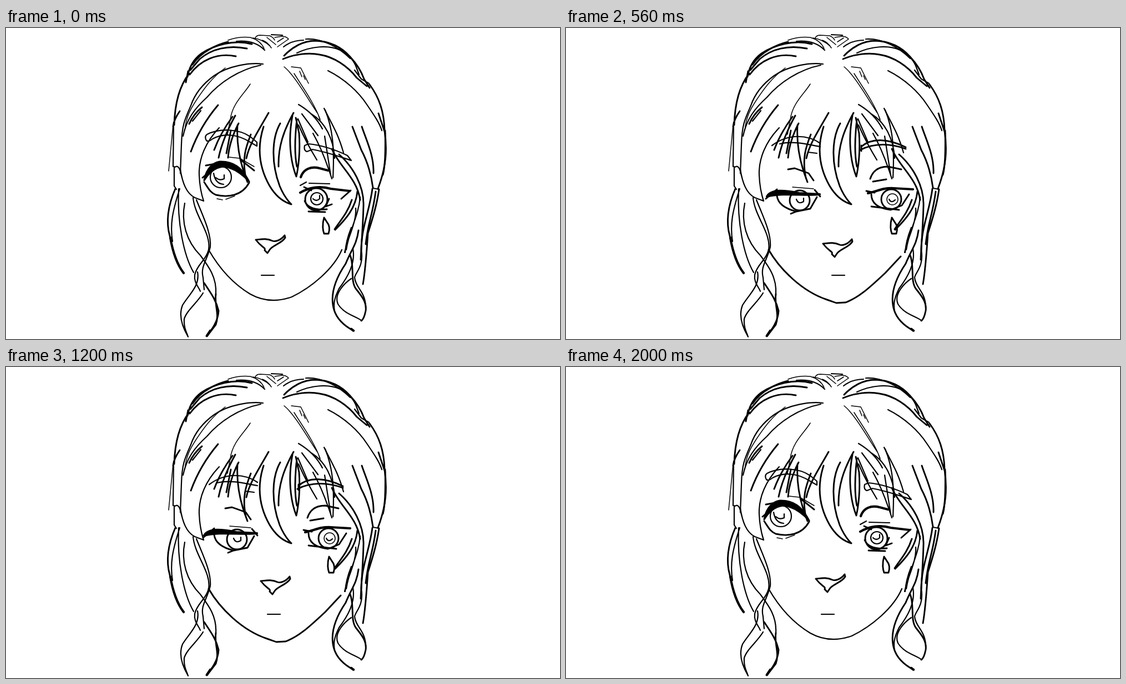
Recreate the animation shown at these times as an HTML page. Size 998 px wide and 561 px high, loop 2160 ms.

```html
<!DOCTYPE html>
<html lang="en">
<meta charset="utf-8">
<title>Face turning</title>
<style>
html, body { margin: 0; width: 100%; height: 100%; overflow: hidden; background: #fff }
svg { display: block; width: 998px; height: 561px }
path, circle, ellipse { fill: none; stroke: #000; stroke-linecap: round; stroke-linejoin: round }
.pose, .jaw { display: none }
.on { display: inline }
.ink { fill: #000 }
.t { stroke-width: 1.5 }
.n { stroke-width: 2.2 }
.m { stroke-width: 2.9 }
.b { stroke-width: 4.2 }
</style>
<svg viewBox="0 0 998 561">
  <!-- crown -->
  <path class="t" d="M449 18Q451 13 458 13L475 14Q482 17 484 22M484 17L497 15Q505 15 509 20L489 34M489 25L500 18M470 17L486 30M445 18Q462 20 476 33M462 22Q472 26 478 36M400 22Q420 15 440 17Q458 22 465 37"/>
  <path class="n" d="M478 12L498 13M536 22Q515 22 500 34M415 24Q448 21 466 40M540 20C570 18 600 35 620 55M524 45C550 33 580 30 602 40"/>
  <path class="m" d="M443 29C410 20 375 31 352 46C336 58 330 72 327 88M434 37C400 30 370 38 349 56L332 76M414 51C380 44 350 58 331 84M400 25C380 30 352 42 336 66"/>
  <path class="m" d="M501 50C515 35 535 23 557 23C585 24 605 35 620 52C632 65 640 78 645 92L655 108M499 56C520 47 545 44 565 48C590 52 615 68 632 90L650 105"/>
  <path class="n" d="M600 37Q622 50 630 68L636 84M628 76L640 92L654 100"/>
  <!-- left side -->
  <path class="m" d="M330 82C312 105 304 140 303 175M328 78L324 98M313 150C306 160 302 170 301 178M353 143Q338 155 330 173"/>
  <path class="n" d="M302 170L301 250M351 149L336 168"/>
  <path class="t" d="M301 175L293 258M395 72C370 90 355 112 343 130C330 150 325 160 322 185M440 101C430 118 408 135 404 165L399 192"/>
  <path class="n" d="M463 65C440 62 400 68 375 86C350 104 338 125 333 140C322 165 317 175 316 210L314 262M459 67C420 75 385 98 362 125C340 145 325 165 319 195"/>
  <path class="m" d="M382 139C360 165 345 190 333 223"/>
  <path class="n" d="M384 180C360 205 347 235 348 265C349 290 353 303 356 312M314 255C318 280 325 298 340 306L356 312M303 252Q309 246 313 255L317 270M303 250V285L307 291"/>
  <!-- fringe -->
  <path class="m" d="M408 160Q386 190 375 220M413 158Q390 200 383 234M405 185L397 226M419 172Q402 205 400 234M417 175C415 210 422 245 434 275M441 192C432 215 425 235 432 270L435 278M473 153C455 185 438 210 433 235"/>
  <path class="m" d="M464 178C452 215 455 250 475 285C487 305 500 314 514 318M494 172C478 200 478 245 493 285C500 302 508 312 514 318M518 153C500 185 490 215 491 250"/>
  <path class="m" d="M516 158C508 200 512 240 523 268C528 245 530 220 528 190L522 162M524 165C520 200 520 230 524 250"/>
  <path class="n" d="M527 175Q540 205 560 238M553 190C570 220 580 250 587 272M575 148C588 180 592 215 589 270M527 138Q556 155 570 182M533 155L562 194M550 155C575 170 590 200 592 235M574 195L585 266M526 164L544 206"/>
  <path class="t" d="M514 70L531 72L545 100M501 70C520 85 545 130 562 155L567 170M519 82C535 108 555 135 566 165M529 78L533 88M536 86L539 93"/>
  <!-- right side -->
  <path class="n" d="M580 77C610 92 635 115 650 138C665 160 673 172 677 185M573 145C588 175 598 190 608 225M661 289L672 291"/>
  <path class="m" d="M655 102C672 125 681 150 682 185C687 220 685 250 670 290M671 154L683 190M624 178L640 220Q656 250 661 288M641 178C650 205 663 230 662 262"/>
  <path class="m" d="M683 185C684 225 683 250 679 265M600 228C625 250 645 285 644 320C643 360 640 390 639 418M587 218C600 250 632 270 638 310M633 295C630 325 612 345 593 364M623 310C615 335 600 350 592 363"/>
  <path class="m" d="M672 291C668 320 660 345 652 370C650 400 647 440 643 462M660 290C655 330 640 360 640 400M666 295C660 340 652 350 648 390"/>
  <path class="n" d="M638 305C635 340 618 365 613 400M630 325C632 350 615 380 610 405M622 360Q612 385 611 405"/>
  <!-- right lock -->
  <path class="m" d="M635 365C632 390 622 400 612 425C595 450 585 475 589 500C592 520 605 535 626 546M620 410C628 430 620 455 630 470C642 485 650 495 648 510C646 520 644 526 640 528"/>
  <path class="n" d="M625 398C630 425 615 450 600 470C590 490 590 500 592 512M640 400C645 430 630 440 628 450C630 470 648 475 648 505M622 452C610 460 590 480 598 498C608 515 630 520 641 528"/>
  <!-- left lock -->
  <path class="m" d="M305 290C292 320 288 350 295 375C300 400 308 425 320 442"/>
  <path class="b" d="M296 378Q303 420 320 442M362 555L368 546M622 543L626 546"/>
  <path class="n" d="M313 290C300 330 295 355 300 385M311 290C308 350 320 410 338 441M322 316C315 350 325 385 350 410C365 430 380 450 378 480"/>
  <path class="n" d="M337 306C340 340 370 370 365 400C360 420 345 425 340 445C338 460 348 468 350 475M343 310C355 340 370 370 368 395C362 420 350 430 355 450L357 472"/>
  <path class="n" d="M345 440C350 465 330 480 318 500C310 520 318 540 328 557M355 478C345 495 325 510 321 525C320 540 325 548 328 557"/>
  <path class="m" d="M357 460C370 480 378 490 383 510C382 530 370 545 361 556M378 480C375 500 385 515 378 535L362 556"/>
  <!-- jaw -->
  <path class="jaw n" d="M365 400C385 435 410 462 440 480C465 494 490 494 515 485C550 468 590 435 605 400"/>
  <path class="jaw m" d="M365 400C385 435 425 475 470 490L487 496L504 495C530 485 550 465 575 442L603 412"/>
  <!-- shared features -->
  <path id="nose" class="m" d="M450 382C462 398 468 395 466 401L471 406L475 400C480 392 498 388 503 378L502 374C495 383 485 386 480 384C470 379 460 381 450 382"/>
  <path id="mouth" class="n" d="M460 446H483"/>
  <path id="tear" class="m" d="M573 342C569 355 571 366 573 371H581Q585 358 578 350Z"/>

  <!-- looking left -->
  <g class="pose">
    <path class="n" d="M361 203Q357 196 362 192C385 180 420 182 440 196L452 206V213L440 206C415 190 390 190 372 200Q365 206 361 203M538 212Q536 221 542 223L552 219C580 224 600 232 622 239L615 230C590 218 565 211 545 209Z"/>
    <path class="ink m" d="M357 275C360 255 372 243 385 241C410 240 425 252 438 277C425 263 410 252 392 250C377 251 366 260 357 275Z"/>
    <path class="m" d="M360 248L382 244M354 270L368 258M423 238L447 257M357 278C365 290 368 297 378 301C400 306 425 303 438 279"/>
    <path class="t" d="M402 233L421 235L447 250M380 308L390 310M396 309L412 303"/>
    <circle class="n" cx="387" cy="269" r="19"/>
    <path class="n" d="M378 270Q385 276 393 272V265M374 262Q377 281 392 282"/>
    <path class="b" d="M531 269C536 254 550 249 565 253L580 257M530 297C545 288 565 284 585 290L619 294"/>
    <path class="m" d="M604 308L621 293M537 287L550 293M582 308L576 322L587 318M538 312C542 322 552 329 578 327M545 331L575 332"/>
    <path class="n" d="M546 280L583 281M530 284L541 278"/>
    <circle class="m" cx="559" cy="309" r="20"/><circle class="n" cx="560" cy="308" r="11"/>
    <path class="n" d="M553 308Q559 314 565 308V302"/>
  </g>

  <!-- starting to turn -->
  <g class="pose">
    <path class="m" d="M377 192C400 183 430 188 458 207M375 190C405 178 440 190 460 205M452 209H459V203M532 214C550 198 580 199 612 215M530 220C555 207 585 208 612 218M532 212V222"/>
    <path class="ink b" d="M360 267C380 248 410 255 434 275C410 262 385 256 360 267Z"/>
    <path class="m" d="M359 259L372 258M364 250L378 256M372 246L386 255M383 244L393 254M393 243L401 256M423 238L447 250M355 269L372 287L376 298M380 302C400 311 430 306 437 280"/>
    <path class="b" d="M386 314L411 312L432 304"/>
    <circle class="b" cx="391" cy="275" r="19"/><circle class="n" cx="391" cy="273" r="12"/>
    <path class="n" d="M387 270Q389 280 397 274"/>
    <path class="ink b" d="M531 268C540 250 560 245 600 246Q612 248 614 255Q595 249 555 254Q540 258 531 268Z"/>
    <path class="ink b" d="M528 288C545 279 570 274 592 276L622 288C600 290 570 286 545 290Z"/>
    <path class="m" d="M532 272Q540 264 552 264M545 273L580 268M622 290L600 310L580 325M530 322L541 302M540 314C548 322 560 325 586 331M540 328L585 330"/>
    <circle class="m" cx="562" cy="305" r="21"/><circle class="n" cx="563" cy="304" r="12"/>
    <path class="n" d="M556 304Q559 312 567 304"/>
  </g>

  <!-- nearly turned, also used shifted for the halfway pose -->
  <g class="pose">
    <path class="n" d="M371 212C400 190 435 192 458 208M385 209C410 203 435 210 458 214M436 224L452 226"/>
    <path class="m" d="M532 214C550 198 580 199 612 215M530 220C555 207 585 208 612 218M532 212V222"/>
    <path class="m" d="M400 255L412 253L437 262L446 275M548 272C553 256 565 250 580 250L604 255M553 277L577 273"/>
    <path class="t" d="M408 287L446 290"/>
    <path class="ink b" d="M362 304C370 290 395 293 420 298L457 300C430 303 390 296 362 304Z"/>
    <path class="m" d="M360 308L380 291M380 303C382 318 395 326 415 331L440 326L452 305M405 335L415 331M448 292L458 304"/>
    <circle class="m" cx="421" cy="311" r="18"/>
    <path class="n" d="M415 309Q419 319 428 313V307"/>
    <path class="b" d="M544 298C560 295 570 288 590 289L625 291"/>
    <path class="m" d="M541 294L556 297M550 300C550 315 560 325 585 328L605 320L618 300M550 322L600 328"/>
    <circle class="m" cx="586" cy="309" r="18"/><circle class="t" cx="588" cy="309" r="10"/>
    <path class="n" d="M582 309Q586 317 593 310"/>
  </g>

  <!-- looking right -->
  <g class="pose">
    <path class="m" d="M365 221C380 205 410 200 452 216M363 229L385 218C410 216 430 222 453 231L454 224"/>
    <path class="b" d="M533 200C555 185 585 183 617 191M533 208L548 203C570 192 595 188 617 192M532 198L537 208L547 204"/>
    <path class="t" d="M398 254L412 251L426 254M433 249Q442 252 446 266M436 258L446 256M385 285L452 286M544 262L566 256L552 254"/>
    <path class="ink b" d="M364 303C368 291 390 295 410 298L452 295C430 302 390 298 364 303Z"/>
    <path class="n" d="M360 308L382 290M445 297L467 294M378 312C385 322 400 328 415 333L440 322L450 300"/>
    <ellipse class="n" cx="425" cy="312" rx="18" ry="15"/><circle class="t" cx="428" cy="312" r="8"/>
    <path class="n" d="M544 262C555 250 575 247 605 256"/>
    <path class="ink m" d="M536 310C545 285 565 272 585 270C605 270 615 283 620 295C605 280 590 277 577 280C560 284 545 298 536 310Z"/>
    <path class="m" d="M554 274L570 273M612 285L622 303M538 312C545 322 560 330 580 331C600 330 612 318 618 302M565 332L588 334"/>
    <circle class="m" cx="587" cy="297" r="19"/><circle class="t" cx="588" cy="295" r="12"/>
    <path class="n" d="M581 297Q588 303 596 298V292"/>
  </g>
</svg>
<script>
const $ = s => document.querySelector(s);
const groups = document.querySelectorAll('.pose');
const jaws = document.querySelectorAll('.jaw');
// Each pose: face group, jaw, face shift, then nose, mouth and tear offsets
const poses = [
  [0, 0, 0, [0, 0], [0, 0], [0, 0]],
  [1, 0, 0, [5.5, 1], [2, 0], [2, 0]],
  [2, 1, -5, [9, 4], [11, 0], [9, 0]],
  [2, 1, 0, [13, 7], [19, 0], [14, 0]],
  [3, 1, 0, [15.5, 3], [20, -2], [17, -2]]
];
// Each turn: start time, step times after it, direction
const turns = [
  [40, [0, 80, 160, 240], 1],
  [560, [0, 80, 160, 200], -1],
  [1120, [0, 80, 160, 240], 1],
  [1800, [0, 80, 160, 200], -1]
];
const LOOP = 2160;
let shown = -1;

function poseAt(t) {
  let pose = 0;
  for (const [start, steps, dir] of turns)
    pose += dir * steps.filter(s => t >= start + s).length;
  return pose;
}

function show(n) {
  const [face, jaw, shift, ...offsets] = poses[n];
  groups.forEach((g, i) => g.classList.toggle('on', i === face));
  jaws.forEach((j, i) => j.classList.toggle('on', i === jaw));
  groups[face].setAttribute('transform', `translate(${shift})`);
  ['#nose', '#mouth', '#tear'].forEach((id, i) =>
    $(id).setAttribute('transform', `translate(${offsets[i]})`));
}

function tick() {
  const n = poseAt(performance.now() % LOOP);
  if (n !== shown) show(shown = n);
  requestAnimationFrame(tick);
}
tick();
</script>
</html>
```
